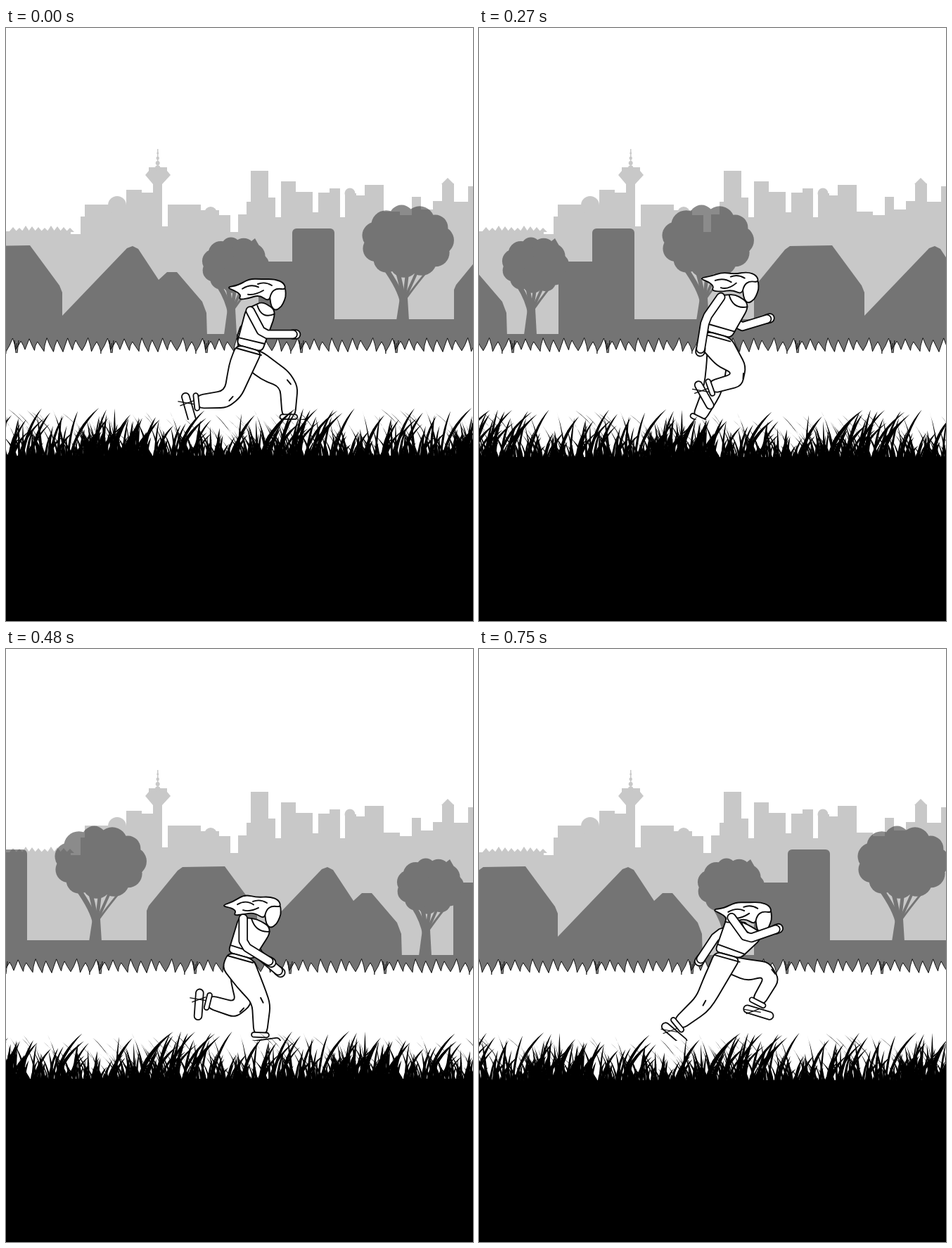
Animation of 664x843 px, one loop 0.78 s. Source, as an HTML page with a canvas:

```html
<!DOCTYPE html>
<html lang="en">
<head>
<meta charset="utf-8">
<title>Runner</title>
<style>
html, body { margin: 0; width: 664px; height: 843px; overflow: hidden; background: #fff; }
canvas { display: block; }
</style>
</head>
<body>
<canvas id="stage" width="664" height="843"></canvas>
<script>
const W = 664, H = 843, LOOP = 780, STEP = 30;
const ctx = document.getElementById('stage').getContext('2d');

function layer(width, height, paint) {
  const c = document.createElement('canvas');
  c.width = width;
  c.height = height;
  paint(c.getContext('2d'));
  return c;
}

function randomFrom(seed) {
  return () => (seed = (seed * 16807) % 2147483647) / 2147483647;
}

function polygon(g, ...coords) {
  g.beginPath();
  for (let i = 0; i < coords.length; i += 2) g.lineTo(coords[i], coords[i + 1]);
  g.fill();
}

function disc(g, x, y, rx, ry = rx) {
  g.beginPath();
  g.ellipse(x, y, rx, ry, 0, 0, 7);
  g.fill();
}

// Main blocks of the skyline: left edge and roof height
const roofs = [
  [0, 289], [92, 293], [106, 268], [112, 251], [171, 230], [193, 234], [209, 222],
  [222, 282], [230, 251], [277, 259], [303, 266], [319, 290], [330, 265], [342, 247],
  [348, 203], [373, 241], [383, 269], [391, 218], [412, 233], [436, 262], [444, 234],
  [460, 228], [475, 269], [482, 235], [498, 238], [510, 223], [537, 261], [560, 266],
  [577, 240], [590, 258], [607, 246], [620, 221], [637, 247], [657, 225]
];

const city = layer(W, 460, g => {
  g.filter = 'blur(0.7px)';
  g.fillStyle = '#c8c8c8';
  g.beginPath();
  g.moveTo(-5, 470);
  roofs.forEach(([x, y], i) => {
    if (i) g.lineTo(x, roofs[i - 1][1]);
    g.lineTo(x, y);
  });
  g.lineTo(670, 225);
  g.lineTo(670, 470);
  g.fill();
  for (let x = 10; x < 92; x += 9) polygon(g, x - 6, 290, x, 281 + (x % 4), x + 6, 290);
  disc(g, 158, 252, 13);
  disc(g, 291, 263, 9);
  disc(g, 489, 235, 7.5);
  polygon(g, 619, 222, 628, 213, 637, 222);
  g.fillRect(203, 198, 26, 6);
  polygon(g, 203, 203, 229, 203, 234, 209, 222, 222, 209, 222, 198, 209);
  g.fillRect(215, 172, 1.5, 28);
  for (let y = 178; y < 200; y += 7) disc(g, 215.7, y, (y - 165) / 9);
});

// Suburb tile; it spans x = 80 to 794 of the scene
const SUBURB_X = 80, SUBURB_W = 714;

function tree(g, x, y, rx, ry, base, seed) {
  const rnd = randomFrom(seed), fork = y + ry * 1.55, lobes = 11;
  disc(g, x, y, rx * .85, ry * .85);
  for (let i = 0; i < lobes; i++) {
    const a = i / lobes * 2 * Math.PI - 1.75, r = ry * (.34 + .12 * rnd());
    disc(g, x + (rx - r) * Math.cos(a), y + (ry - r) * Math.sin(a), r);
  }
  polygon(g, x - 16, base, x - 11, fork, x, fork, x + 2, base);
  for (let i = 0; i < 5; i++) {
    g.lineWidth = 7 - i;
    g.beginPath();
    g.moveTo(x - 7, fork + 8);
    g.quadraticCurveTo(x - 10 + i * 4, fork - 12, x + (i - 2) * rx * .25, y + ry * .7);
    g.stroke();
  }
}

const suburb = layer(SUBURB_W, 462, g => {
  g.translate(-SUBURB_X, 0);
  g.fillStyle = g.strokeStyle = '#393939';
  g.fillRect(80, 435, SUBURB_W, 40);
  g.fillRect(467, 414, 330, 40);
  polygon(g, 80, 409, 172, 313, 180, 310, 188, 314, 217, 358, 229, 347, 243, 347, 279, 389, 285, 405, 286, 440, 80, 440);
  polygon(g, 637, 372, 640, 365, 681, 315, 688, 310, 748, 309, 790, 366, 794, 376, 794, 440, 637, 440);
  g.fillRect(359, 332, 60, 110);
  g.beginPath();
  g.roundRect(407, 285, 60, 180, 6);
  g.fill();
  polygon(g, 340, 310, 354, 299, 375, 336);
  tree(g, 326, 337, 48, 40, 436, 5);
  tree(g, 571, 303, 66, 52, 416, 12);
});

// White meadow with outlined blades
const MEADOW_W = 135;
const meadow = layer(MEADOW_W * 7, 30, g => {
  g.translate(0, -438);
  g.fillStyle = '#fff';
  for (let tile = 0; tile < 7; tile++) {
    const rnd = randomFrom(77), left = tile * MEADOW_W, blades = 10, gap = MEADOW_W / blades;
    g.beginPath();
    g.moveTo(left, 470);
    g.lineTo(left, 460);
    for (let i = 1; i <= blades; i++) {
      const x = left + i * gap, tip = x - gap * (.3 + .4 * rnd()), low = 457 + rnd() * 5;
      g.quadraticCurveTo(tip - 4, 452, tip, 440 + rnd() * 6);
      g.quadraticCurveTo(tip + 4, 452, x, i === blades ? 460 : low);
    }
    g.lineTo(left + MEADOW_W, 470);
    g.fill();
    g.lineWidth = .9;
    g.stroke();
    for (let i = 0; i < 3; i++) {
      g.beginPath();
      g.moveTo(left + 14 + i, 462);
      g.lineTo(left + 12 + i * 3, 444 + (i % 2) * 4);
      g.stroke();
    }
  }
  g.fillRect(0, 463, MEADOW_W * 7, 10);
});

// Dark grass in front
const GRASS_W = 530;
const grass = layer(GRASS_W, 90, g => {
  const rnd = randomFrom(90210);
  function blade(x, height) {
    const lean = (rnd() - .5) * height * 1.5, half = 1.2 + rnd() * 1.2;
    for (const shift of [-GRASS_W, 0, GRASS_W]) {
      const b = x + shift, bend = b + lean * .2;
      g.beginPath();
      g.moveTo(b - half, 82);
      g.quadraticCurveTo(bend - half, 82 - height * .65, b + lean, 80 - height);
      g.quadraticCurveTo(bend + half, 82 - height * .55, b + half, 82);
      g.fill();
    }
  }
  for (let x = 0; x < GRASS_W; x += 2) blade(x + rnd() * 2, 18 + 52 * rnd() ** 1.3);
  for (let i = 0; i < 50; i++) blade(110 + rnd() * 80, 20 + rnd() * 40);
  for (let i = 0; i < 25; i++) blade(350 + rnd() * 60, 20 + rnd() * 36);
  for (let x = 0; x < GRASS_W; x += 5) polygon(g, x - 3, 90, x + rnd() * 4, 66 + rnd() * 10, x + 7, 90);
  g.fillRect(0, 78, GRASS_W, 12);
});

// Gait of one side: phase, then degrees from straight down for thigh, shin, upper arm, forearm
const gait = [
  [0, -20, -84, 28, 90],
  [.115, -4, -104, 3, 50],
  [.27, 15, -99, -8, 8],
  [.46, 84, -28, -75, -35],
  [.5, 58, 0, -45, 5],
  [.615, 36, -2, 0, 58],
  [.77, 0, -11, 0, 105],
  [.96, -28, -49, 36, 110]
];

// Path of the body: phase, waist x and y, head x and y
const body = [
  [0, 346, 455, 386, 382],
  [.115, 346, 442, 381, 374],
  [.27, 350, 434, 387, 364],
  [.46, 326, 438, 384, 383],
  [.615, 334, 436, 379, 377],
  [.77, 347, 435, 391, 361],
  [.96, 354, 434, 405, 385]
];

function sample(keys, phase) {
  const u = phase % 1;
  const next = keys.findIndex(k => k[0] > u);
  const a = keys.at(next < 0 ? -1 : next - 1), b = next < 0 ? keys[0] : keys[next];
  const k = (u - a[0]) / ((next < 0 ? 1 : b[0]) - a[0]);
  return a.slice(1).map((v, i) => v + (b[i + 1] - v) * k);
}

const add = (p, x, y) => [p[0] + x, p[1] + y];
const mix = (a, b, k) => [a[0] + (b[0] - a[0]) * k, a[1] + (b[1] - a[1]) * k];

// Point at a distance from p; 0 degrees is down, positive turns to the right
function swing(p, degrees, length) {
  const a = degrees * Math.PI / 180;
  return add(p, length * Math.sin(a), length * Math.cos(a));
}

// Closed outline whose corners are rounded by up to r pixels
function shape(points, r = 10) {
  const n = points.length;
  ctx.beginPath();
  points.forEach((p, i) => {
    const toward = q => mix(p, q, Math.min(.5, r / (Math.hypot(q[0] - p[0], q[1] - p[1]) || 1)));
    ctx.lineTo(...toward(points[(i + n - 1) % n]));
    ctx.quadraticCurveTo(...p, ...toward(points[(i + 1) % n]));
  });
  ctx.closePath();
  ctx.fill();
  ctx.stroke();
}

function line(...points) {
  ctx.beginPath();
  points.forEach(p => ctx.lineTo(...p));
  ctx.stroke();
}

function curve(a, c, b) {
  ctx.beginPath();
  ctx.moveTo(...a);
  ctx.quadraticCurveTo(...c, ...b);
  ctx.stroke();
}

// White band with a dark outline
function tube(points, width) {
  ctx.save();
  ctx.lineWidth = width + 3.6;
  line(...points);
  ctx.strokeStyle = '#fff';
  ctx.lineWidth = width;
  line(...points);
  ctx.restore();
}

function arm(shoulder, upper, fore) {
  const elbow = swing(shoulder, upper, 38), wrist = swing(elbow, fore, 43);
  tube([wrist, swing(wrist, fore, 4)], 11);
  tube([shoulder, mix(shoulder, elbow, .85), mix(elbow, wrist, .15), wrist], 10);
}

function shoe(ankle, shin) {
  const sole = swing(ankle, shin, 13), foot = shin + 100;
  tube([swing(sole, foot, -9), swing(sole, foot, 24)], 9);
  ctx.lineWidth = 1.2;
  line(add(sole, -13, -2), add(sole, 10, 2));
  line(add(sole, -10, 4), add(sole, 9, -3));
  ctx.lineWidth = 1.9;
}

function leg(hip, thigh, shin, back, front) {
  const knee = swing(hip, thigh, 60), ankle = swing(knee, shin, 49);
  const bend = (thigh + shin) / 2;
  const behind = swing(ankle, shin - 90, 9), ahead = swing(ankle, shin + 90, 9);
  shoe(ankle, shin);
  shape([
    back, add(hip, -21, 2), swing(mix(hip, knee, .4), thigh - 90, 17), swing(knee, bend - 90, 14),
    behind, ahead,
    swing(mix(knee, ankle, .12), shin + 90, 13), swing(mix(knee, hip, .12), thigh + 90, 13), front
  ]);
  tube([behind, ahead], 5);
  line(swing(knee, bend, -4), swing(knee, bend + 20, 4));
}

function drawHead(head, phase) {
  const at = (x, y) => add(head, x, y);
  const wave = x => 2 * Math.sin(phase * 4 * Math.PI + x / 12);
  const hair = (x, y) => at(x, y + (x < -20 ? wave(x) : 0));
  shape([at(11, -14), at(12, 0), at(6, 14), at(-3, 20), at(-9, 14), at(-12, -8), at(0, -16)], 5);
  shape([
    at(12, -10), at(9, -20), at(-4, -25), hair(-22, -23), hair(-40, -26), hair(-56, -18), hair(-73, -14),
    hair(-58, -9), hair(-52, -4), hair(-55, 2), hair(-42, 2), hair(-26, -1), at(-12, 7), at(-9, -6), at(-1, -12)
  ], 9);
  curve(hair(-50, -13), hair(-38, -19), hair(-27, -12));
  curve(hair(-42, -4), hair(-32, -1), hair(-20, -9));
  curve(at(-28, -18), at(-18, -22), at(-8, -16));
}

function drawRunner(phase) {
  const [wx, wy, hx, hy] = sample(body, phase);
  const waist = [wx, wy], head = [hx, hy];
  const [thigh, shin, upper, fore] = sample(gait, phase);
  const far = sample(gait, phase + .5);
  const shoulder = add(waist, 2 + .4 * (hx - wx - 42), -53);
  const chest = add(head, -4, 28);
  const back = add(waist, -18, -5), front = add(waist, 18, 5);

  ctx.save();
  ctx.beginPath();
  ctx.rect(0, 0, W, 557);
  ctx.clip();
  ctx.fillStyle = '#fff';
  ctx.strokeStyle = '#0a0a0a';
  ctx.lineWidth = 1.9;
  ctx.lineJoin = ctx.lineCap = 'round';

  arm(mix(shoulder, chest, .4), far[2], far[3]);
  leg(add(waist, 5, 17), far[0], far[1], waist, front);

  const nape = add(head, -22, 7), throat = add(head, -5, 17);
  shape([nape, add(shoulder, -6, -2), back, front, mix(front, chest, .6), chest, throat], 7);
  const collar = mix(shoulder, nape, .6);
  curve(collar, add(collar, 6, 20), mix(chest, throat, .3));
  line(mix(back, shoulder, .2), mix(front, chest, .22));

  leg(add(waist, -6, 15), thigh, shin, back, front);
  line(add(back, -1, 5), add(front, -1, 5));
  drawHead(head, phase);
  arm(shoulder, upper, fore);
  ctx.restore();
}

function draw(time) {
  const step = Math.floor(time / STEP);
  ctx.fillStyle = '#fff';
  ctx.fillRect(0, 0, W, H);
  ctx.drawImage(city, 0, 0);

  ctx.globalAlpha = .58;
  const suburbX = Math.round(SUBURB_X - step * 27.3);
  for (let x = suburbX - SUBURB_W; x < W; x += SUBURB_W) ctx.drawImage(suburb, x, 0);
  ctx.globalAlpha = 1;

  ctx.fillRect(0, 462, W, H);
  ctx.drawImage(meadow, Math.round(-MEADOW_W - (step * 26.3) % MEADOW_W), 438);

  drawRunner(step * STEP / LOOP);

  const drop = Math.round(step * .2);
  for (let x = Math.round(-step * 44) % GRASS_W; x < W; x += GRASS_W) ctx.drawImage(grass, x, 530 + drop);
  ctx.fillStyle = '#000';
  ctx.fillRect(0, 608 + drop, W, H);
}

const start = performance.now();
function tick() {
  draw((performance.now() - start) % LOOP);
  requestAnimationFrame(tick);
}
tick();
</script>
</body>
</html>
```
